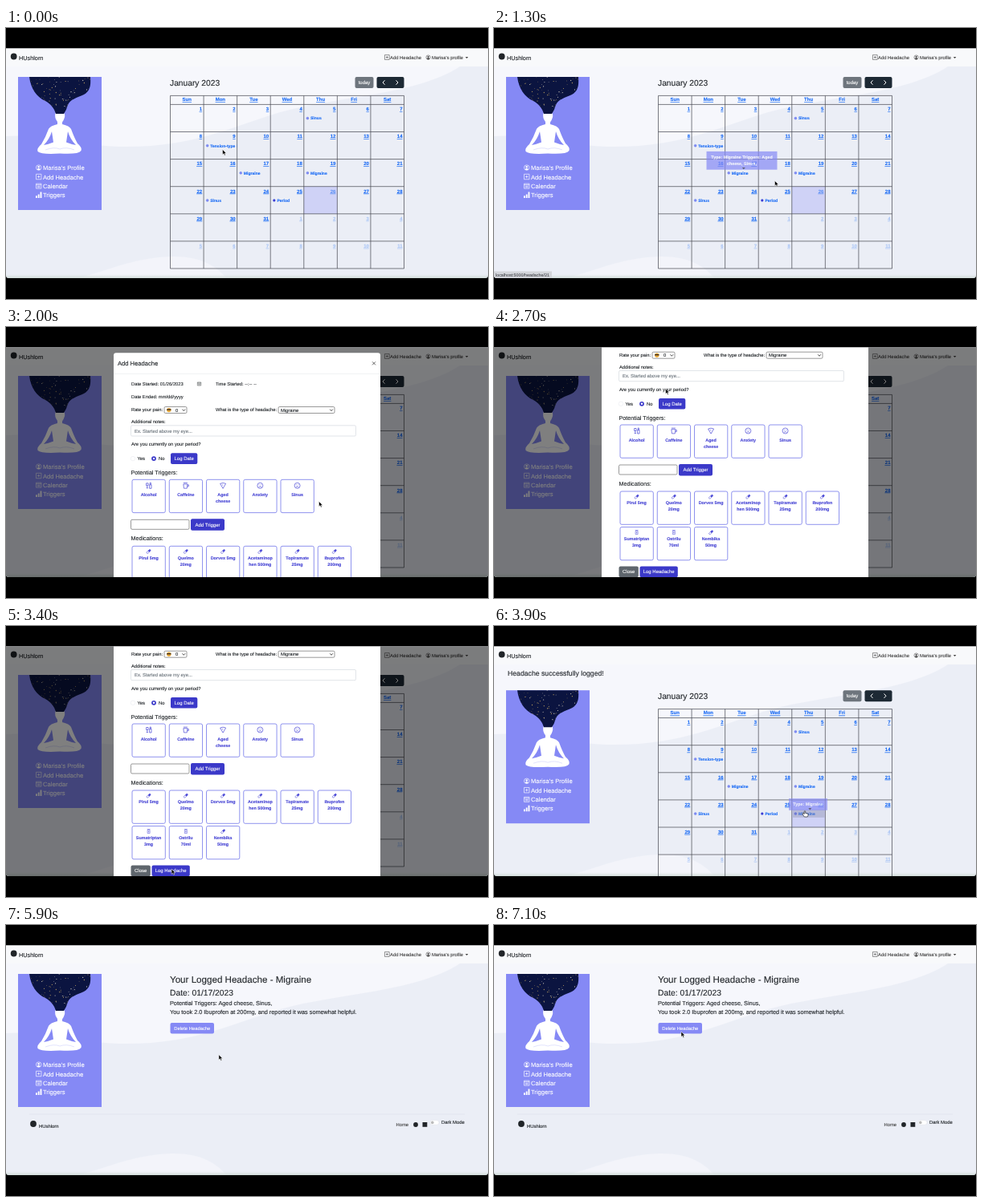
An HTML page for the animation above (7.2 s loop, 600 px wide and 338 px high).

```html
<!DOCTYPE html>
<html lang="en">
<head>
<meta charset="utf-8">
<title>Headache diary</title>
<style>
  html, body { margin: 0; height: 100%; overflow: hidden; background: #000; }
  svg text { font-family: "Liberation Sans", Arial, sans-serif; text-rendering: geometricPrecision; }
  #stage { display: block; width: 100vw; height: 100vh; }
</style>
</head>
<body>
<svg id="stage" viewBox="0 0 600 338"></svg>
<script>
const LOOP = 7200, STEP = 100;
const INK = '#212529', LILAC = '#8589f5', INDIGO = '#3b39c9', LINK = '#1769f5';
const APP = 'HUshlorn', USER = "Marisa's";

// Markup helpers; the hairline stroke gives text a slightly heavier rendering
const text = (x, y, size, str, fill = INK, more = '') =>
  `<text x="${x}" y="${y}" font-size="${size}" fill="${fill}" stroke="${fill}" stroke-width=".12" ${more}>${str}</text>`;
const rect = (x, y, w, h, fill, more = '') =>
  `<rect x="${x}" y="${y}" width="${w}" height="${h}" fill="${fill}" ${more}/>`;
const circle = (x, y, r, fill, more = '') => `<circle cx="${x}" cy="${y}" r="${r}" fill="${fill}" ${more}/>`;
const path = (d, fill, more = '') => `<path d="${d}" fill="${fill}" ${more}/>`;
const line = (d, color, width = .7) => path(d, 'none', `stroke="${color}" stroke-width="${width}"`);
const group = (id, body, more = '') => `<g id="${id}" ${more}>${body}</g>`;
const button = (x, y, w, h, label, fill, size = 6) =>
  rect(x, y, w, h, fill, 'rx="2"') + text(x + w / 2, y + h / 2 + 2.1, size, label, '#fff', 'text-anchor="middle"');
const BOLD = 'font-weight="bold"', MID = 'text-anchor="middle"', UNDER = 'text-decoration="underline"';

// Small icons, drawn in an s-sized square at x, y
const icons = {
  person: c => line('M.5 4a3.5 3.5 0 1 0 7 0a3.5 3.5 0 1 0-7 0', c) + circle(4, 3.1, 1.3, c) + path('M1.6 6.2q2.4-2.6 4.8 0q-2.4 2.4-4.8 0', c),
  plus: c => line('M.5.5h7v7h-7zM4 2.2v3.6M2.2 4h3.6', c),
  calendar: c => line('M.5 1h7v6.5h-7zM.5 2.6h7M2 4.3h4M2 5.8h4', c),
  bars: c => path('M0 5h2v3H0zM3 3h2v5H3zM6 0h2v8H6z', c),
  glass: c => line('M1 1h2.4v3H1zM2.2 4v3M1 7h2.4M5 3h2.4v4.5H5zM5.6 3V.5h1.2V3', c),
  cup: c => line('M1 .6h5M1 2.2h5l-.6 5.2H1.6zM6 3h1.5v2H5.8', c),
  cheese: c => line('M.5 1.5q3.5-1.6 7 0L4 7.6zM3 3.2h1.2', c),
  face: c => line('M.5 4a3.5 3.5 0 1 0 7 0a3.5 3.5 0 1 0-7 0M2.4 3h.8M4.8 3h.8M2.4 5.8q1.6-1.6 3.2 0', c),
  pill: c => path('M.8 5.4L5 1.2q1-.6 1.8.2t.2 1.8L2.8 7.3q-1.1.6-1.8-.2t-.2-1.7z', 'none', `stroke="${c}" stroke-width=".8"`)
    + path('M2.9 3.3L5 1.2q1-.6 1.8.2t.2 1.8L4.9 5.2z', c),
  jar: c => line('M1.5.6h5M2 2h4v5.4H2zM3 4.7h2M4 3.7v2', c),
};
const icon = (name, x, y, s, color) => `<g transform="translate(${x} ${y}) scale(${s / 8})">${icons[name](color)}</g>`;

function backdropArt() {
  return rect(0, 25, 600, 288, '#ebeef6')
    + path('M0 48H565C520 78 440 84 370 98C300 112 250 148 150 148C90 148 45 131 0 135z', '#f6f7fc')
    + path('M85 313C125 304 155 287 205 285C240 284 262 296 275 313z', '#f3f4fa')
    + rect(0, 307, 600, 5, 'url(#shade)');
}

function navbar() {
  return rect(0, 25, 600, 23, '#f8f9fb')
    + circle(9.7, 35.5, 3.9, INK) + text(16, 40, 7.3, APP)
    + icon('plus', 471, 33.2, 6.6, '#444') + text(478, 38.8, 5.9, 'Add Headache', '#444')
    + icon('person', 522.6, 33.6, 6, '#333') + text(530, 38.8, 5.85, USER + ' profile', '#444')
    + path('M571.8 36h3.6l-1.8 2z', '#444');
}

const HAIR = 'M29 61H105C106 73 104 79 97 83C88 87 80 89 77 96Q75 103 72 107H62C60 100 56 95 49 91C38 86 31 76 29 61z';

function sidebar() {
  let seed = 7, specks = '';
  const rnd = () => (seed = seed * 16807 % 2147483647) / 2147483647;
  for (let i = 0; i < 100; i++)
    specks += circle((29 + rnd() * 76).toFixed(1), (61 + rnd() * 40).toFixed(1), (.25 + rnd() * .4).toFixed(2), i % 3 ? '#b0965c' : '#d6d0c0');
  const items = [['person', USER + ' Profile'], ['plus', 'Add Headache'], ['calendar', 'Calendar'], ['bars', 'Triggers']];
  return rect(15, 61, 104, 166, LILAC)
    + path('M61.5 106Q67 100 73 107Q74 112 70 117.5V120Q79 122 81 126Q85 137 89 144Q95 149 93.5 153Q90 158 67 156.5Q44 158 39.5 154Q38 150 44 145Q49 137 53 126Q55 122 64 120V117Q60 112 61.5 106z', '#fff')
    + path(HAIR, '#0b1440') + `<g clip-path="url(#hair)">${specks}</g>`
    + path('M57 129Q54 139 47 146Q53 145 59 142.5zM77 129Q80 139 87 146Q81 145 75 142.5z', LILAC)
    + line('M49 152Q60 148 67 151Q75 148 85 152', '#cfd1fb', .6)
    + items.map(([name, label], i) => icon(name, 37, 170.4 + 11.4 * i, 7.4, '#fff') + text(46, 177.3 + 11.3 * i, 7.6, label, '#fff')).join('');
}

const COL = 41.57, ROW = 34.1, LEFT = 204.5, TOP = 95.4;
const cell = day => ({ x: LEFT + COL * ((day - 1) % 7), y: TOP + ROW * Math.floor((day - 1) / 7) });

function entry(day, label, dot = LILAC, color = LINK) {
  const { x, y } = cell(day);
  return `<svg x="${x + 1}" y="${y + 11}" width="${COL - 1.4}" height="12">`
    + circle(3.6, 6.2, 1.5, dot, 'stroke="#5b7fe8" stroke-width=".4"') + text(7.2, 8, 5.05, label, color, BOLD) + '</svg>';
}
const hover = day => rect(cell(day).x + 1.2, cell(day).y + 12, COL - 2.2, 10, '#000', 'opacity=".12"');

function calendar() {
  let out = text(204, 71.7, 10.25, 'January 2023') + button(434.5, 61, 23, 14, 'today', '#6e757d')
    + rect(461.5, 61, 34, 14, '#1d2934', 'rx="2"') + line('M471.5 65.3l-2.5 2.7 2.5 2.7M485.5 65.3l2.5 2.7-2.5 2.7', '#fff', 1);
  const today = cell(26);
  out += rect(today.x, today.y, COL, ROW, LILAC, 'opacity=".28"');
  let grid = `M${LEFT} 84.4h291`;
  for (let i = 0; i < 8; i++) grid += `M${LEFT + COL * i} 84.4V300`;
  for (let i = 0; i < 7; i++) grid += `M${LEFT} ${TOP + ROW * i}h291`;
  out += line(grid, '#44454e', .7);
  ['Sun', 'Mon', 'Tue', 'Wed', 'Thu', 'Fri', 'Sat'].forEach((name, i) =>
    out += text(LEFT + COL * (i + .5), 91.3, 6, name, LINK, `${BOLD} ${MID} ${UNDER}`));
  for (let d = 1; d <= 42; d++) {
    const { x, y } = cell(d);
    out += text(x + COL - 2, y + 7.8, 6, d > 31 ? d - 31 : d, LINK,
      `${BOLD} ${UNDER} text-anchor="end" opacity="${d > 31 ? .3 : d === 26 ? .6 : 1}"`);
  }
  return out + entry(5, 'Sinus') + entry(9, 'Tension-type headache') + entry(17, 'Migraine') + entry(19, 'Migraine')
    + entry(23, 'Sinus') + entry(25, 'Period', '#3a30d0');
}

function details() {
  return text(204, 71.5, 11.6, 'Your Logged Headache - Migraine') + text(204, 87.8, 10.3, 'Date: 01/17/2023')
    + text(204, 99.6, 7.3, 'Potential Triggers: Aged cheese, Sinus,')
    + text(204, 111.2, 7.3, 'You took 2.0 Ibuprofen at 200mg, and reported it was somewhat helpful.')
    + button(204.5, 122, 54.5, 13.5, 'Delete Headache', LILAC, 5.85)
    + line('M29 236H571', '#dcdee8', .6)
    + circle(34, 248, 3.9, INK) + text(41, 253, 5.9, APP)
    + text(485.5, 251, 5.8, 'Home', '#444') + circle(510, 249, 2.9, INK) + rect(518.5, 246, 5.8, 5.8, INK)
    + rect(528, 243.6, 11, 5.6, '#fff', 'rx="2.8" stroke="#d5d7de" stroke-width=".4"') + circle(530.8, 246.4, 1.8, '#bbb')
    + text(542, 248.2, 5.9, 'Dark Mode');
}

function card(i, y, name, label) {
  const x = 157 + 46.25 * i, medication = name === 'pill' || name === 'jar', size = medication ? 6 : 8;
  return rect(x, y, 41.3, 41.3, '#fff', 'rx="2" stroke="#7276ea" stroke-width=".8"')
    + icon(name, x + 20.6 - size / 2, y + 3.5, size, '#4a48d6')
    + label.split('|').map((s, k) =>
      text(x + 20.6, y + (medication ? 16.2 : 20.5) + 8 * k, 5.4, s, '#4644d4', `${BOLD} ${MID}`)).join('');
}
const field = (x, y, w, h, color = '#555') => rect(x, y, w, h, '#fff', `rx="1.5" stroke="${color}" stroke-width=".6"`);
const arrowDown = (x, y) => line(`M${x - 1.8} ${y - 1}l1.8 2 1.8-2`, '#222', .8);

function form() {
  const triggers = [['glass', 'Alcohol'], ['cup', 'Caffeine'], ['cheese', 'Aged|cheese'], ['face', 'Anxiety'], ['face', 'Sinus']];
  const meds = ['Pirul 5mg', 'Quelmo|20mg', 'Dorvex 5mg', 'Acetaminop|hen 500mg', 'Topiramate|25mg', 'Ibuprofen|200mg'];
  const more = [['jar', 'Sumatriptan|3mg'], ['jar', 'Ostrilu|70ml'], ['pill', 'Nembika|50mg']];
  return rect(134, -36, 332, 358, '#fff', 'rx="3"')
    + text(139, -20.5, 7.6, 'Add Headache') + line('M456 -25l4 4m0-4l-4 4', '#555', .9) + line('M134 -10H466', '#dee2e6', .5)
    + text(156, 5, 5.8, 'Date Started: 01/26/2023') + icon('calendar', 238, 0, 5, INK)
    + text(261, 5, 5.8, 'Time Started: --:-- --') + text(156, 21, 5.8, 'Date Ended: mm/dd/yyyy')
    + text(156, 37, 5.75, 'Rate your pain:') + field(197, 31.2, 28, 8)
    + circle(202.8, 35.3, 2.7, '#e8a93a') + rect(200.2, 34, 5.2, 1.4, '#3b2a20') + text(211, 37.3, 5.8, '0') + arrowDown(221.3, 35.3)
    + text(261, 37, 5.75, 'What is the type of headache:') + field(339, 31.2, 70, 8) + text(342, 37.3, 5.8, 'Migraine') + arrowDown(405, 35.3)
    + text(156, 51.5, 5.75, 'Additional notes:') + field(155.5, 54.5, 280, 13.2, '#ced4da')
    + text(160, 63.2, 5.85, 'Ex. Started above my eye...', '#6c757d')
    + text(156, 80, 5.85, 'Are you currently on your period?')
    + circle(158, 95.8, 2.8, '#fff', 'stroke="#e4e6ec" stroke-width=".5"') + text(163.5, 97.8, 5.85, 'Yes')
    + circle(184, 95.8, 2.9, INDIGO) + circle(184, 95.8, 1.2, '#fff') + text(190, 97.8, 5.85, 'No')
    + button(205, 89, 33.3, 13.6, 'Log Date', INDIGO)
    + text(155.5, 115.7, 7.2, 'Potential Triggers:') + triggers.map((c, i) => card(i, 122, ...c)).join('')
    + field(155.5, 172, 72.5, 12) + button(230, 171, 42, 14.4, 'Add Trigger', INDIGO)
    + text(155.5, 198, 7.2, 'Medications:') + meds.map((m, i) => card(i, 205, 'pill', m)).join('')
    + more.map((c, i) => card(i, 249.5, ...c)).join('')
    + button(155.5, 298.5, 24.3, 13.6, 'Close', '#5f666d') + button(181.5, 298.5, 47.3, 13.6, 'Log Headache', INDIGO);
}

// Tooltip whose last text line ends just above an entry
function tooltip(cx, bottom, w, lines) {
  const h = 6.6 + 8.1 * lines.length;
  return rect(cx - w / 2, bottom - h, w, h, LILAC)
    + lines.map((s, i) => text(cx, bottom - h + 9 + 8 * i, 5.35, s, '#fff', `${BOLD} ${MID}`)).join('')
    + path(`M${cx + .3} ${bottom - 2.8}h4l-2 2.4z`, '#22243c');
}

stage.innerHTML = `<defs>
  <clipPath id="view"><path d="M0 25.5H600V308.5q0 3.5-4 3.5H4q-4 0-4-3.5z"/></clipPath>
  <clipPath id="hair"><path d="${HAIR}"/></clipPath>
  <linearGradient id="shade" x2="0" y2="1"><stop stop-color="#dfe8e6" stop-opacity="0"/><stop offset="1" stop-color="#cfdad7"/></linearGradient>
</defs>` + rect(0, 0, 600, 338, '#000') + `<g clip-path="url(#view)">`
  + backdropArt() + navbar()
  + group('flash', text(17, 62, 8.7, 'Headache successfully logged!'))
  + group('page', sidebar()
    + group('month', calendar() + group('added', entry(26, 'Migraine', LILAC, '#4b83f2'))
      + group('hover17', hover(17)) + group('hover26', hover(26))
      + group('tip17', tooltip(308.5, 176.7, 88, ['Type: Migraine Triggers: Aged', 'cheese, Sinus,']))
      + group('tip26', tooltip(391, 210.6, 48, ['Type: Migraine']))))
  + group('detail', details())
  + group('status', rect(0, 303.5, 72, 9, '#d3d5da') + text(2, 310.2, 5.35, 'localhost:5000/headache/21', '#505258'))
  + group('dim', rect(0, 25, 600, 288, '#000')) + group('modal', form()) + '</g>'
  + group('cursor', group('arrow', path('M0 0V6.4L1.5 5.1L2.6 7.4L3.7 6.9L2.7 4.7H4.7z', '#000', 'stroke="#fff" stroke-width=".5"'))
    + group('hand', path('M-.8 0Q0-1 .7 0V2.4L4 3.2Q4.4 5.5 3.2 7H-.6L-2.8 4Q-2-.0 -.8 3.6z', '#fff', 'stroke="#111" stroke-width=".6"')));

const $ = id => document.getElementById(id);
const ramp = (t, start, length) => Math.min(1, Math.max(0, (t - start) / length));
const smooth = p => p * p * (3 - 2 * p);
const between = (t, a, b) => t >= a && t < b;
const show = (id, on) => $(id).setAttribute('display', on ? 'inline' : 'none');
const fade = (id, value) => $(id).setAttribute('opacity', value);
const move = (id, x, y) => $(id).setAttribute('transform', `translate(${x} ${y})`);

const LOGGED = 3450, OPENED = 5300;
// Pointer stops: time, x, y
const stops = [[0, 269.5, 151.5], [100, 269.5, 151.5], [500, 309, 183], [1000, 309, 183], [1300, 349.5, 190.5], [1650, 389.5, 217.5],
  [2000, 389.5, 217.5], [2500, 213.5, 77], [2750, 213.5, 77], [3150, 206, 303], [3400, 206, 303], [3750, 387, 231],
  [4100, 387, 231], [4600, 309.5, 202], [5400, 309.5, 202], [6300, 233, 133], [LOOP, 233, 133]];

function pointer(t) {
  const i = stops.findIndex(s => s[0] > t), [t0, x0, y0] = stops[i - 1], [t1, x1, y1] = stops[i];
  const p = smooth((t - t0) / (t1 - t0));
  return [x0 + (x1 - x0) * p, y0 + (y1 - y0) * p];
}

function draw(t) {
  const logged = between(t, LOGGED, OPENED);
  show('month', t < OPENED);
  show('detail', t >= OPENED);
  show('flash', logged);
  show('added', logged);
  move('page', 0, logged ? 19.2 : 0);

  show('hover17', between(t, 500, 1150) || between(t, 4600, OPENED));
  show('hover26', between(t, 3750, 4150));
  fade('tip17', .95 * (ramp(t, 500, 150) - ramp(t, 1260, 150) + ramp(t, 4600, 150)));
  fade('tip26', .95 * (ramp(t, 3800, 150) - ramp(t, 4150, 150)));
  show('status', between(t, 700, 1500) || between(t, 4800, OPENED));

  const open = between(t, 1650, LOGGED), slide = ramp(t, 1785, 300);
  show('dim', open);
  show('modal', open);
  fade('dim', .5 * ramp(t, 1650, 150));
  fade('modal', ramp(t, 1785, 150));
  move('modal', 0, (49 + 21 * (1 - (1 - slide) ** 2)) * (1 - smooth(ramp(t, 2200, 450))));

  const hand = between(t, 500, 1100) || between(t, 3750, 4200);
  show('hand', hand);
  show('arrow', !hand);
  move('cursor', ...pointer(t));
}

function tick(now) {
  draw(Math.floor(now % LOOP / STEP) * STEP);
  requestAnimationFrame(tick);
}
tick(performance.now());
</script>
</body>
</html>
```
